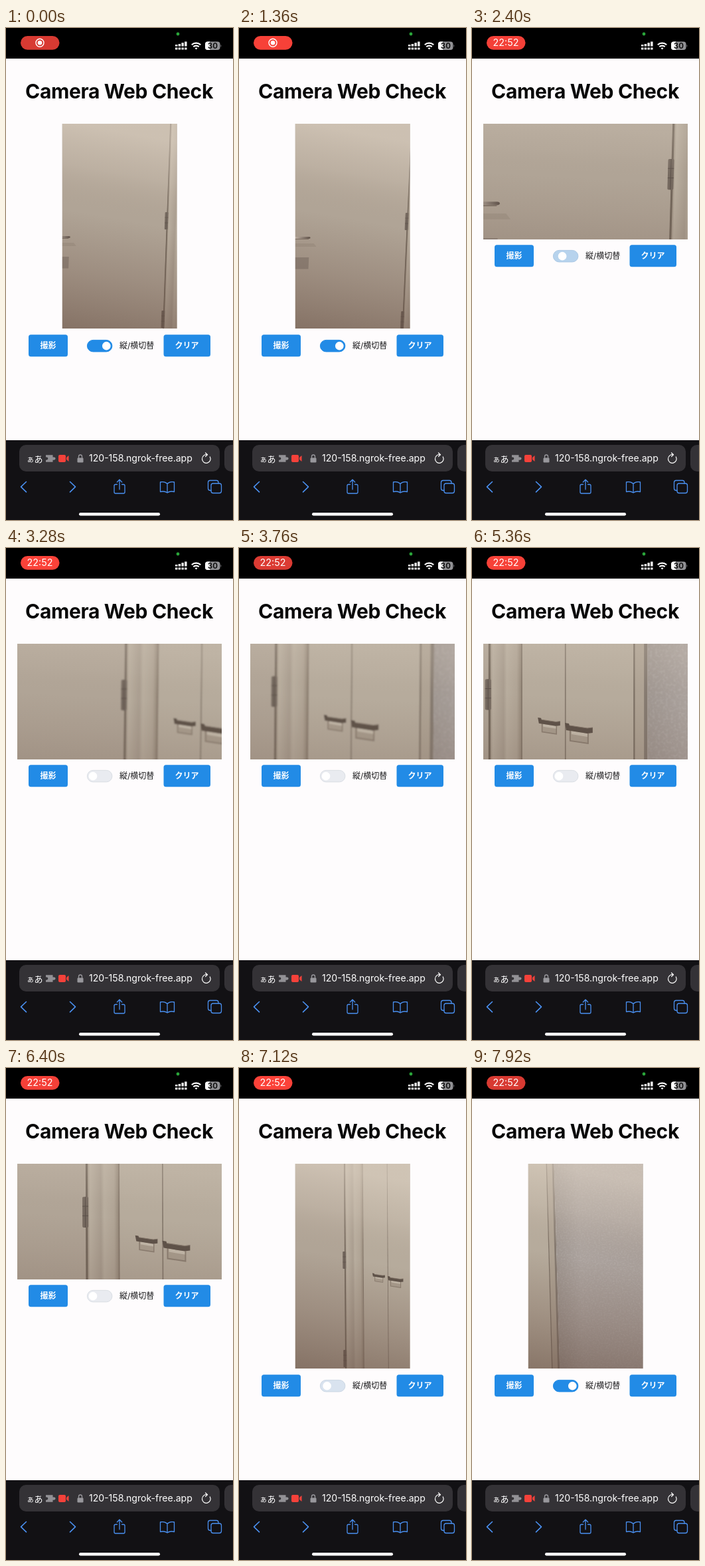
Write an HTML page that moves like this. It is 342 by 740 pixels and loops after 8 s.

```html
<!DOCTYPE html>
<html lang="ja">
<head>
<meta charset="utf-8">
<title>Camera Web Check</title>
<style>
  html, body { margin: 0; width: 100%; height: 100%; overflow: hidden; background: #000; }
  svg { display: block; width: 342px; height: 740px; }
  text { font-family: Inter, "Noto Sans CJK JP", "Noto Sans CJK", sans-serif; }
  .mid { text-anchor: middle; }
  .btn { fill: #228be6; }
  .btnText { fill: #fff; font-size: 12px; font-weight: 600; text-anchor: middle; }
  .line { fill: none; stroke-linecap: round; stroke-linejoin: round; }
  .tool { stroke: #4a90f0; stroke-width: 1.3; }
  #pill { animation: pulse 2s infinite; }
  @keyframes pulse {
    0%, 100% { fill: #d83a32; }
    40%, 64% { fill: #fb4239; }
  }
</style>
</head>
<body>
<svg viewBox="0 0 342 740">
  <defs>
    <clipPath id="clip"><rect id="clipBox"/></clipPath>
    <filter id="blur" filterUnits="userSpaceOnUse" x="0" y="125" width="342" height="345">
      <feGaussianBlur id="blurAmount" stdDeviation="0.3"/>
    </filter>
    <filter id="grain" x="0" y="0" width="1" height="1">
      <feTurbulence type="fractalNoise" baseFrequency="0.45" numOctaves="2" seed="4"/>
      <feColorMatrix values="0 0 0 0 1  0 0 0 0 1  0 0 0 0 1  1.6 0 0 0 -0.7"/>
    </filter>
    <linearGradient id="shade" x1=".1" y1="0" x2="0" y2="1">
      <stop offset="0" stop-color="#e6dacb" stop-opacity=".52"/>
      <stop offset=".2" stop-color="#dccfc0" stop-opacity=".28"/>
      <stop offset=".4" stop-color="#b5a595" stop-opacity="0"/>
      <stop offset=".42" stop-color="#654a3e" stop-opacity="0"/>
      <stop offset=".7" stop-color="#654a3e" stop-opacity=".24"/>
      <stop offset="1" stop-color="#5a4034" stop-opacity=".5"/>
    </linearGradient>
    <linearGradient id="frame">
      <stop offset="0" stop-color="#8d8072"/>
      <stop offset=".12" stop-color="#b9ae9f"/>
      <stop offset=".45" stop-color="#a99d8f"/>
      <stop offset=".55" stop-color="#b8ad9e"/>
      <stop offset=".85" stop-color="#b0a495"/>
      <stop offset="1" stop-color="#948778"/>
    </linearGradient>
    <linearGradient id="wall">
      <stop offset="0" stop-color="#9f9690"/>
      <stop offset=".12" stop-color="#aba29d"/>
      <stop offset="1" stop-color="#a0958f"/>
    </linearGradient>
    <linearGradient id="lever" gradientUnits="userSpaceOnUse" x1="-170" y1="0" x2="-143" y2="0">
      <stop offset="0" stop-color="#d8cbbd"/>
      <stop offset="1" stop-color="#5c5048"/>
    </linearGradient>
    <g id="pull">
      <path d="M4 5V13.500L17.500 15.500V8" fill="#a99d8e" stroke="#8c7f72" stroke-width="1"/>
      <path d="M5 6L17 8V10.500L5 8.500Z" fill="#c5bbac"/>
      <path d="M0 0L3 0.500L3.500 2L17 4L21 3.500V7.500L17 8L1 5.500Z" fill="#5e5249"/>
      <path d="M3.500 2L17 4L21 3.500" fill="none" stroke="#83766a" stroke-width=".6"/>
    </g>
    <g id="hinge">
      <rect x="-2" y="-13" width="5" height="26" rx="1" fill="#75695f"/>
      <path d="M.5 -13V13M-2 -5H3M-2 3H3" stroke="#5b5049" stroke-width=".6"/>
    </g>
  </defs>

  <rect width="342" height="740" fill="#000"/>
  <rect y="46" width="342" height="574" fill="#fefcfd"/>
  <rect y="620" width="342" height="120" fill="#121114"/>

  <!-- status bar -->
  <rect id="pill" x="22" y="12" width="58.500" height="20.700" rx="10.350"/>
  <g id="recIcon">
    <circle cx="51" cy="22.300" r="6" fill="none" stroke="#fff" stroke-width="1.400"/>
    <circle cx="51" cy="22.300" r="3.300" fill="#fff"/>
  </g>
  <text id="clock" class="mid" x="51" y="27.400" font-size="14.300" font-weight="400" fill="#fff">22:52</text>
  <circle cx="259" cy="9" r="2.400" fill="#2aa53a"/>
  <g fill="#fff">
    <path d="M255 25h3.400v2.500h-3.400zM259.700 24h3.400v3.500h-3.400zM264.400 22.300h3.400v5.200h-3.400zM269.100 20.500h3.400v7h-3.400z"/>
    <path d="M255 29.500h3.400v3h-3.400zM259.700 29.500h3.400v3h-3.400zM264.400 29.500h3.400v3h-3.400zM269.100 29.500h3.400v3h-3.400z"/>
  </g>
  <g class="line" stroke="#fff" stroke-width="2.200" style="stroke-linecap:butt">
    <path d="M279.800 25.300a9.700 9.700 0 0 1 13.400 0M282.300 28.300a6 6 0 0 1 8.400 0"/>
    <path d="M286.500 32.500l-2-2.200a3 3 0 0 1 4 0z" fill="#fff" stroke="none"/>
  </g>
  <rect x="300" y="20.500" width="22.500" height="12.500" rx="4" fill="#929295"/>
  <path d="M307 20.500h-3a4 4 0 0 0 -4 4v4.500a4 4 0 0 0 4 4h3z" fill="#fff"/>
  <path d="M323.500 24.800q1.800 2 0 4z" fill="#929295"/>
  <text class="mid" x="311.300" y="30.900" font-size="11.500" font-weight="700" fill="#111">30</text>

  <text class="mid" x="170.500" y="105.700" font-size="30" font-weight="700" letter-spacing="-.35" fill="#080808">Camera Web Check</text>

  <!-- camera view -->
  <g clip-path="url(#clip)">
    <g filter="url(#blur)">
      <g id="world">
        <rect x="-500" y="-400" width="503" height="800" fill="#b0a496"/>
        <path d="M-200 23H-146q2.500 0 2.500 1.500T-146 26H-200z" fill="url(#lever)"/>
        <path d="M-200 26.500H-146" stroke="#75685c" stroke-width=".8"/>
        <path d="M-200 33h62l4 5h-66z" fill="#8b7e71" opacity=".3"/>
        <rect x="-200" y="54" width="55.500" height="17.500" fill="#91867b"/>
        <rect x="1" y="-400" width="28" height="800" fill="url(#frame)"/>
        <rect x=".8" y="-400" width="1.700" height="800" fill="#74685c"/>
        <use href="#hinge"/>
        <use href="#hinge" y="148"/>
        <rect x="29" y="-400" width="95" height="800" fill="#b6ab9c"/>
        <rect x="28.500" y="-400" width="1" height="800" fill="#85786b"/>
        <rect x="65.500" y="-400" width=".9" height="800" fill="#82766a"/>
        <rect x="124" y="-400" width="11.500" height="800" fill="#aea293"/>
        <rect x="123.500" y="-400" width="1.300" height="800" fill="#7d7165"/>
        <rect x="132.500" y="-400" width="3" height="800" fill="#857a70"/>
        <use href="#pull" transform="translate(42.600 19.500) scale(.9)"/>
        <use href="#pull" transform="translate(65.500 24) scale(1.120)"/>
        <rect x="135.500" y="-400" width="300" height="800" fill="url(#wall)"/>
        <rect x="136" y="-180" width="230" height="360" filter="url(#grain)" opacity=".16"/>
      </g>
    </g>
    <rect id="shadeBox" fill="url(#shade)"/>
  </g>

  <!-- controls -->
  <g id="controls">
    <rect class="btn" x="34" y="461.300" width="59" height="33" rx="3.500"/>
    <text class="btnText" x="63.500" y="482.300">撮影</text>
    <rect id="track" x="122.400" y="469.400" width="37.500" height="17.500" rx="8.750"/>
    <circle id="knob" cy="478.150" r="6.300" fill="#fff"/>
    <text x="171" y="482.300" font-size="12" fill="#1c1c1e">縦/横切替</text>
    <rect class="btn" x="237.500" y="461.300" width="70.500" height="33" rx="3.500"/>
    <text class="btnText" x="272.500" y="482.300">クリア</text>
  </g>

  <!-- browser bar -->
  <rect x="20" y="627" width="302" height="40" rx="10" fill="#343236"/>
  <rect x="329" y="627" width="30" height="40" rx="10" fill="#343236"/>
  <text x="31" y="652.500" font-size="13" fill="#fff"><tspan font-size="11.500">ぁ</tspan>あ</text>
  <path d="M60 642.300h10.500v3.200h2a2 2 0 0 1 0 4.200h-2v3h-10.500v-3h1.200a2.100 2.100 0 0 0 0 -4.200H60z" fill="#929195"/>
  <path d="M81 642h7a2 2 0 0 1 2 2v7a2 2 0 0 1 -2 2h-7a2 2 0 0 1 -2 -2v-7a2 2 0 0 1 2 -2zM91 646l3.500-3v9l-3.500-3z" fill="#f5413a"/>
  <rect x="107.500" y="646.500" width="9" height="7" rx="1.300" fill="#98979c"/>
  <path class="line" d="M109.500 646.500v-2a2.500 2.500 0 0 1 5 0v2" stroke="#98979c" stroke-width="1.300"/>
  <text x="125" y="652.200" font-size="14.050" fill="#fff">120-158.ngrok-free.app</text>
  <path class="line" d="M307.300 645a6.300 6.300 0 1 1 -4.500 -3.200M300.500 639l3 2.800l-3 2.800" stroke="#fff" stroke-width="1.200"/>

  <g class="line tool">
    <path d="M30.500 682.500l-8 7.700l8 7.700M96.500 682.500l8 7.700l-8 7.700" stroke-width="1.600"/>
    <path d="M167.500 686.500h-2.500a2 2 0 0 0 -2 2v9.500a2 2 0 0 0 2 2h12a2 2 0 0 0 2 -2v-9.500a2 2 0 0 0 -2 -2h-2.500M171 694v-14.500M167.300 683l3.700-3.700l3.700 3.700"/>
    <path d="M243 685.500q-4-4-10.500-2.500v14.500q6.500-1.500 10.500 1.500q4-3 10.500-1.500v-14.500q-6.500-1.500-10.500 2.500v13.500"/>
    <rect x="309" y="685" width="15.500" height="14.500" rx="3"/>
    <path d="M309 695.500h-1.500a3 3 0 0 1 -3 -3v-9a3 3 0 0 1 3 -3h9.500a3 3 0 0 1 3 3v1.500"/>
  </g>
  <rect x="110" y="729" width="122" height="4.400" rx="2.200" fill="#fff"/>
</svg>

<script>
const LOOP = 8000, TO_WIDE = 2300, TO_TALL = 7100, CLOCK_AT = 1840;
const PAN = [[0, 70], [1360, 81], [2300, 74], [3280, 3.400], [4320, -126], [5360, -83], [6240, -35], [7120, -13], [7920, -179], [8000, -184]];
const LIFT = [[0, -8], [1360, -7], [3280, -5.600], [4320, -12], [5360, -6], [7120, -9], [8000, -9]];
const LEAN = [[0, -.036], [1360, -.045], [3280, -.012], [4320, -.005], [5360, 0], [7120, .007], [8000, .03]];
const VIEW = {
  tall: { x: 84.700, y: 144, w: 173, h: 308, zoom: 1, shade: 1, drop: 0 },
  wide: { x: 17, y: 144, w: 308, h: 174, zoom: 1.780, shade: .35, drop: -135 }
};
const $ = id => document.getElementById(id);
const set = (id, attrs) => { for (const k in attrs) $(id).setAttribute(k, attrs[k]); };
const clamp = v => Math.max(0, Math.min(1, v));
const mix = (a, b, p) => a + (b - a) * p;

// Cubic through the keys that never overshoots them.
function curve(keys, t) {
  const rise = i => keys[i + 1] && keys[i] ? (keys[i + 1][1] - keys[i][1]) / (keys[i + 1][0] - keys[i][0]) : NaN;
  const slope = i => {
    const a = rise(i - 1), b = rise(i);
    if (isNaN(a)) return b;
    if (isNaN(b)) return a;
    return a * b <= 0 ? 0 : 2 * a * b / (a + b);
  };
  let i = 0;
  while (i < keys.length - 2 && t >= keys[i + 1][0]) i++;
  const [t0, a] = keys[i], [t1, b] = keys[i + 1];
  const d = t1 - t0, p = (t - t0) / d, q = 1 - p;
  return a * q * q * (1 + 2 * p) + b * p * p * (3 - 2 * p) + d * p * q * (q * slope(i) - p * slope(i + 1));
}

function draw(t) {
  const wide = t >= TO_WIDE && t < TO_TALL;
  const v = wide ? VIEW.wide : VIEW.tall;
  const box = { x: v.x, y: v.y, width: v.w, height: v.h };
  set("clipBox", box);
  set("shadeBox", { ...box, opacity: v.shade });

  const pan = curve(PAN, t);
  const x = v.x + v.w / 2 + pan * v.zoom;
  const y = v.y + v.h / 2 + curve(LIFT, t) * v.zoom;
  const z = v.zoom;
  set("world", { transform: `matrix(${z} 0 ${curve(LEAN, t) * z} ${z} ${x} ${y})` });
  const speed = Math.abs(pan - curve(PAN, Math.max(0, t - 10))) / 10 * z;
  set("blurAmount", { stdDeviation: Math.min(1.100, .3 + speed * 3.500).toFixed(2) });

  const p = clamp((t - (wide ? TO_WIDE : TO_TALL)) / 150);
  const ease = p * p * (3 - 2 * p);
  const on = wide ? 1 - ease : t < TO_WIDE ? 1 : Math.max(.08, ease);
  const tint = (a, b) => `rgb(${a.map((c, i) => Math.round(mix(c, b[i], on)))})`;
  set("track", { fill: tint([233, 235, 240], [34, 139, 230]), stroke: tint([218, 222, 228], [34, 139, 230]) });
  set("knob", { cx: mix(131, 151.300, on) });
  set("controls", { transform: `translate(0 ${v.drop})` });

  const time = clamp((t - CLOCK_AT) / 160);
  set("clock", { opacity: time });
  set("recIcon", { opacity: 1 - time });
}

function tick() {
  const t = performance.now() % LOOP;
  draw(t);
  for (const a of document.getAnimations()) a.currentTime = t;
  requestAnimationFrame(tick);
}
tick();
</script>
</body>
</html>
```
